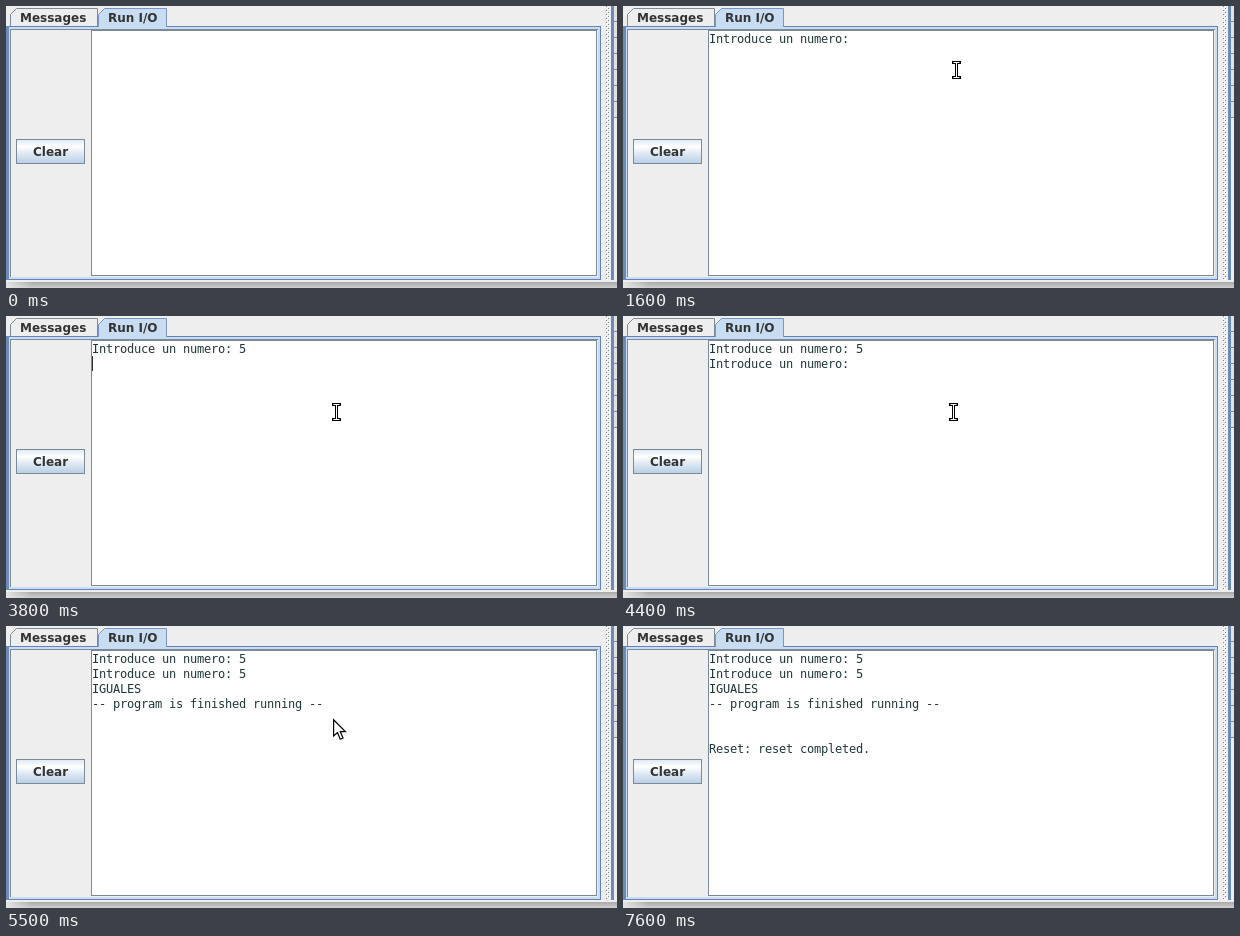
An HTML page that plays this animation: 611 by 282 pixels, repeating every 8000 ms.

```html
<!DOCTYPE html>
<html lang="es">
<head>
<meta charset="utf-8">
<title>Run I/O</title>
<style>
  html, body { margin: 0; width: 100%; height: 100%; overflow: hidden; background: #eee; }
  svg { display: block; width: 611px; height: 282px; }
  .box { shape-rendering: crispEdges; }
  .label { font: bold 12px "DejaVu Sans", sans-serif; fill: #333; }
  #console { font: 12px "DejaVu Sans Mono", monospace; fill: #213636; }
</style>
</head>
<body>
<svg viewBox="0 0 611 282" xmlns="http://www.w3.org/2000/svg">
  <defs>
    <linearGradient id="steel" x2="0" y2="1">
      <stop stop-color="#dde8f3"/>
      <stop offset=".3" stop-color="#fff"/>
      <stop offset=".6" stop-color="#dde8f3"/>
      <stop offset="1" stop-color="#b8cfe5"/>
    </linearGradient>
    <linearGradient id="shade" x2="0" y2="1">
      <stop stop-color="#a9a9a9"/>
      <stop offset="1" stop-color="#cfcfcf"/>
    </linearGradient>
    <linearGradient id="corner">
      <stop stop-color="#e4e4e4"/>
      <stop offset="1" stop-color="#e4e4e4" stop-opacity="0"/>
    </linearGradient>
    <pattern id="bumps" width="4" height="4" patternUnits="userSpaceOnUse">
      <path d="M0 0h1v1h-1zM2 2h1v1h-1z" fill="#7a8a99"/>
      <path d="M1 1h1v1h-1zM3 3h1v1h-1z" fill="#fff"/>
    </pattern>
  </defs>

  <g class="box">
    <rect width="611" height="282" fill="#eee"/>
    <!-- tab pane frame -->
    <rect x="2" y="20" width="593" height="254" fill="#6382bf"/>
    <rect x="3" y="21" width="591" height="252" fill="#c8ddf2"/>
    <rect x="4" y="23" width="588" height="248" fill="#7a8a99"/>
    <rect x="5" y="24" width="587" height="247" fill="#eee"/>
    <rect y="20" width="3" height="254" fill="#6e8bb5"/>
    <!-- text area and button -->
    <rect x="85.5" y="24.5" width="505" height="245" fill="#fff" stroke="#7a8a99"/>
    <rect x="10.5" y="133.5" width="68" height="24" fill="url(#steel)" stroke="#7a8a99"/>
    <!-- split bar and neighbour -->
    <rect x="599" width="5" height="274" fill="url(#bumps)"/>
    <rect x="605" width="3" height="274" fill="#6e8bb5"/>
    <rect x="608" width="3" height="111" fill="#e2e2e2"/>
    <g id="rows" fill="#7a8a99"></g>
    <!-- window shadow -->
    <rect y="276" width="611" height="6" fill="url(#shade)"/>
    <rect y="276" width="26" height="6" fill="url(#corner)"/>
  </g>

  <path d="M4.5 20V8.500L10.500 2.500H91.500V20" fill="#eee" stroke="#7a8a99"/>
  <path d="M92.500 21V8.500L98.500 2.500H160.500V21" fill="#c8ddf2" stroke="#7a94c4"/>
  <g class="label">
    <text x="14" y="16">Messages</text>
    <text x="102" y="16">Run I/O</text>
    <text x="27" y="150">Clear</text>
  </g>

  <g id="console"></g>
  <rect id="caret" class="box" width="1" height="15" fill="#333"/>
  <g id="beam" fill="none" stroke-linecap="square">
    <path d="M-3 -7.500H3M-3 7.500H3M0 -7.500V7.500" stroke="#000" stroke-width="3"/>
    <path d="M-2.500 -7.500H2.500M-2.500 7.500H2.500M0 -7.500V7.500" stroke="#fff"/>
  </g>
  <path id="arrow" d="M.6 .8V17L4.500 13.500L7.200 20.200L10 19L7.300 12.600H12.400Z"
        fill="#fff" stroke="#000" stroke-width="1.200"/>
</svg>
<script>
const LOOP = 8000, LEFT = 86, TOP = 25, CELL = 7, LINE = 15;
const $ = id => document.getElementById(id);
const make = (tag, parent, attrs) => {
  const el = document.createElementNS('http://www.w3.org/2000/svg', tag);
  for (const key in attrs) el.setAttribute(key, attrs[key]);
  return parent.appendChild(el);
};

for (let y = 15; y < 112; y += 16) make('rect', $('rows'), { x: 608, y, width: 3, height: 1 });

// [start, end, column, row, text]
const prompt = 'Introduce un numero:';
const texts = [
  [800, 0, 0, prompt],
  [3100, 21, 0, '5'],
  [4000, 0, 1, prompt],
  [4800, 21, 1, '5'],
  [5400, 0, 2, 'IGUALES'],
  [5500, 0, 3, '-- program is finished running --'],
  [7600, 0, 6, 'Reset: reset completed.']
].map(([start, col, row, str]) => {
  const el = make('text', $('console'), {
    x: [...str].map((_, i) => LEFT + CELL * (col + i)).join(' '),
    y: TOP + LINE * row + 12
  });
  el.textContent = str;
  return { start, el };
});

// [time, column, row]; no column means hidden
const caretSteps = [
  [0], [1000, 21, 0], [1400], [1800, 21, 0], [2300], [2800, 21, 0],
  [3100, 22, 0], [3800, 0, 1], [4000, 21, 1], [4400], [4800, 22, 1], [5200]
];

// [time, shape, x, y]
const pointerSteps = [
  [0], [1400, 'beam', 336, 42], [1500, 'beam', 334, 57], [1600, 'beam', 333, 64],
  [1700, 'beam', 335, 64], [1800, 'beam', 336, 64], [2100, 'beam', 337, 71],
  [2200, 'beam', 333, 88], [2300, 'beam', 330, 96],
  [5500, 'arrow', 327, 93], [6500, 'arrow', 372, -1], [6700]
];

const at = (steps, t) => steps.filter(s => s[0] <= t).pop();
const show = (el, on) => el.setAttribute('visibility', on ? 'visible' : 'hidden');

function draw(t) {
  for (const { start, el } of texts) show(el, t >= start);

  const [, col, row] = at(caretSteps, t);
  show($('caret'), col !== undefined);
  if (col !== undefined) {
    $('caret').setAttribute('x', LEFT + CELL * col);
    $('caret').setAttribute('y', TOP + LINE * row);
  }

  const [, shape, x, y] = at(pointerSteps, t);
  for (const id of ['beam', 'arrow']) show($(id), id === shape);
  if (shape) {
    const dx = shape === 'beam' ? 0.5 : 0;
    $(shape).setAttribute('transform', `translate(${x + dx} ${y})`);
  }
}

const begin = performance.now();
function tick() {
  draw((performance.now() - begin) % LOOP);
  requestAnimationFrame(tick);
}
tick();
</script>
</body>
</html>
```
